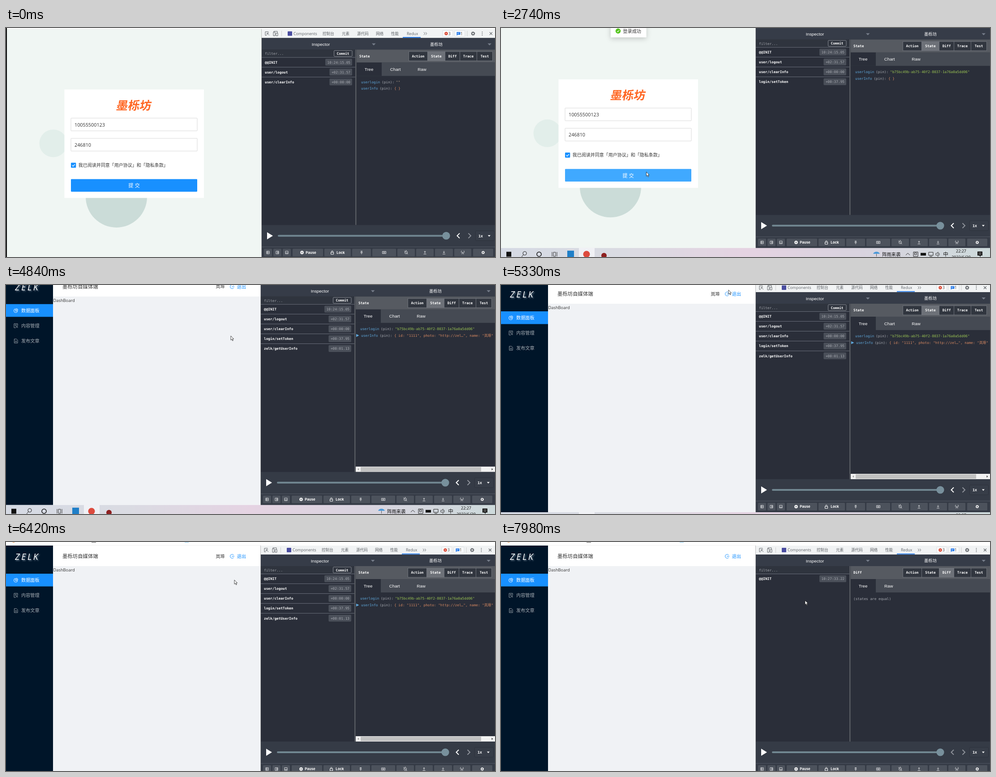
Animation, 1092 px wide and 513 px high, one loop 8000 ms. Source, as an HTML page:

```html
<!DOCTYPE html>
<html lang="zh">
<head>
<meta charset="utf-8">
<title>Login state demo</title>
<style>
html, body { margin: 0; width: 100%; height: 100%; overflow: hidden; background: #000; }
svg { display: block; width: 100vw; height: 100vh; }
text { white-space: pre; font-family: "Open Sans", "Noto Sans CJK SC", "Noto Sans CJK", sans-serif; }
.m { font-family: "DejaVu Sans Mono", "Noto Sans CJK SC", "Noto Sans CJK", monospace; }
.a { font-family: "Liberation Sans", "Noto Sans CJK SC", "Noto Sans CJK", sans-serif; }
</style>
</head>
<body>
<svg id="stage" viewBox="0 0 1092 513"></svg>
<script>
const LOGO = '墨栎坊', USER = '岚埠', DARK = '#2a2e39', BLUE = '#1890ff';

// Markup helpers; text is placed by its vertical centre
const rect = (x, y, w, h, fill, more = '') => `<rect x="${x}" y="${y}" width="${w}" height="${h}" fill="${fill}" ${more}/>`;
const circle = (x, y, r, fill, more = '') => `<circle cx="${x}" cy="${y}" r="${r}" fill="${fill}" ${more}/>`;
const fillPath = (d, fill, more = '') => `<path d="${d}" fill="${fill}" ${more}/>`;
const line = (d, color, w = 1, more = '') => `<path d="${d}" fill="none" stroke="${color}" stroke-width="${w}" ${more}/>`;
const text = (x, y, s, size, fill, more = '') =>
  `<text x="${x}" y="${y + size * .37}" font-size="${size}" fill="${fill}" ${more}>${s}</text>`;
const mono = (x, y, s, fill, more = '') => text(x, y, s, 7.77, fill, `class="m" ${more}`);
const bold = (x, y, s, more = '') => mono(x, y, s, '#fff', `font-weight="700" ${more}`);
const group = (id, ...parts) => `<g id="${id}">${parts.join('')}</g>`;
const at = (x, y, s) => `<g transform="translate(${x} ${y})">${s}</g>`;
const MID = 'text-anchor="middle"', END = 'text-anchor="end"';

const gear = c => circle(0, 0, 2.7, 'none', `stroke="${c}" stroke-width="1.8"`) +
  circle(0, 0, 3.9, 'none', `stroke="${c}" stroke-width="1.3" stroke-dasharray="1.5 1.56"`);

function loginPage() {
  const field = (y, s) => rect(143, y, 282, 28.5, '#fff', 'stroke="#d9d9d9" rx="1"') + text(151, y + 14.7, s, 10.8, '#333');
  return group('login',
    rect(0, 8, 569, 513, '#f0f6f3'),
    circle(103.5, 264, 31, '#e2eeea'), circle(244.5, 384, 68.5, '#cbdcd8'),
    rect(128.5, 143.3, 311.5, 243, '#fff'),
    `<g transform="translate(284 179) skewX(-10)">${text(0, 0, LOGO, 26, '#ff6622', `font-weight="900" ${MID}`)}</g>`,
    field(207.5, '10055500123'), field(252.8, '246810'),
    rect(143, 307.3, 11.3, 11.3, BLUE, 'rx="1.3"'), line('M145.6 313l2.2 2.3 4-4.4', '#fff', 1.3),
    text(159.7, 313, '我已阅读并同意「用户协议」和「隐私条款」', 10, '#333'),
    rect(143, 344, 282, 28.3, 'none', `id="wave" stroke="${BLUE}"`),
    rect(143, 344, 282, 28.3, BLUE, 'id="submit" rx="1.4"'),
    text(284, 358.5, '提 交', 11.4, '#fff', MID));
}

function dashboard() {
  const item = (y, s, icon, c) => at(22, y, line(icon, c, .9)) + text(34, y, s, 10.2, c);
  const doc = 'M-3.5 -4.5H1.5L4 -2V4.5H-3.5ZM-1.5 0H2M-1.5 2H2';
  const logo = (dx, c, more = '') => text(20 + dx, 33 + dx, 'ZELK', 20, c,
    `font-style="italic" letter-spacing="3.4" ${more}`);
  return group('board',
    rect(0, 8, 569, 513, '#f0f2f5'), rect(105, 8, 464, 46, '#fff'), rect(0, 8, 105, 513, '#001529'),
    logo(2, '#9ab', 'opacity=".7" filter="url(#soft)"'), logo(0, '#fff'),
    rect(0, 71, 105, 28.5, BLUE),
    item(85.5, '数据面板', 'M-1 -4A4.3 4.3 0 1 0 4 1H-1ZM1 -4.5V-1H4.5A3.6 3.6 0 0 0 1 -4.5', '#fff'),
    item(119.5, '内容管理', 'M0 4.5H-4V-4.5H4V0M-2 -2H2M-2 0H0M4.5 4.5L3 3M3.6 2A1.5 1.5 0 1 1 .6 2A1.5 1.5 0 1 1 3.6 2', '#a6adb4'),
    item(153.7, '发布文章', doc, '#a6adb4'),
    text(126, 32, LOGO + '自媒体端', 11.4, '#333'),
    group('user', text(468.5, 32, USER, 10, '#333')),
    at(505, 32, line('M3.6 -2.6A4.4 4.4 0 1 0 3.6 2.6M-1 0H5', BLUE, 1)),
    text(515.5, 32, '退出', 10.3, BLUE),
    text(105.5, 62.5, 'DashBoard', 9.3, '#333'));
}

function toolbar() {
  const tabs = [[640, 'Components'], [705, '控制台'], [748, '元素'], [782, '源代码'], [824, '网络'], [858, '性能'], [893, 'Redux']];
  const chip = (x, n, icon) => rect(x, 11, 23, 14, '#f8f9fa', 'stroke="#d0d3d7" stroke-width=".7" rx="1.5"') + icon +
    text(x + 13, 18.2, n, 8.4, '#444');
  return rect(569, 8, 523, 20, '#f1f3f4') +
    line('M584 15V14H577V22H580M581 17L586 22M581 21V17H585', '#5f6368') +
    line('M596 15V13H604V17M595 15H599V23H595ZM601 17H605V23H601Z', '#5f6368') +
    line('M613.5 12V24M1028 12V24', '#ccc') + rect(627, 13, 10, 10, '#4a4da0', 'rx="1"') +
    tabs.map(([x, s]) => text(x, 18, s, s === 'Components' ? 8.8 : 8.6, '#5f6368')).join('') +
    rect(884, 25.8, 40, 1.8, '#1a73e8') +
    line('M931 15l2.7 3-2.7 3M935 15l2.7 3-2.7 3', '#5f6368') +
    chip(973, 3, circle(981, 18, 3.7, '#d9432f') + line('M979.6 16.6l2.8 2.8M982.4 16.6l-2.8 2.8', '#fff', .8)) +
    chip(1000, 1, fillPath('M1004.5 14.5H1012.5V20.5H1007L1004.5 22.5Z', '#1a73e8') + line('M1006 16.7H1011M1006 18.5H1009', '#fff', .7)) +
    at(1041, 18, gear('#5f6368')) +
    [14.5, 18, 21.5].map(y => circle(1061.5, y, .9, '#5f6368')).join('') +
    line('M1078 15l6 6M1084 15l-6 6', '#5f6368', 1.2);
}

function row(i, name, time) {
  const y = 82.3 + 22.1 * i, w = time.length * 4.68 + 8.5;
  return (i ? rect(569, y - 11.5, 209, 1, '#6b707c') : '') + bold(576, y, name) +
    rect(771 - w, y - 7.7, w, 15.3, '#4a4f59', 'rx="2"') + mono(767, y, time, '#a9acb3', END);
}

function header(active, tabs) {
  const modes = [['Action', 898, 42], ['State', 940, 39], ['Diff', 979, 33], ['Trace', 1012, 38], ['Test', 1050, 35]];
  return rect(781, 54, 311, 29, '#565a61') + rect(781, 83, 311, 30, '#454a53') + rect(781, 83, 56, 30, DARK) +
    bold(787, 68.3, active) +
    modes.map(([s, x, w]) => rect(x - .5, 58.5, w, 20.5, s === active ? '#6d7178' : '#31363f', 'stroke="#777b83" stroke-width=".8"') +
      bold(x + w / 2 - .5, 68.5, s, MID)).join('') +
    tabs.map(([s, x]) => text(x, 98, s, 9.7, '#fff', `class="a" ${MID}`)).join('');
}

function tree() {
  const key = (x, y, s) => mono(x, y, s, '#5fa8dc') + mono(x + s.length * 4.68 + 4, y, '(pin):', '#a9acb3');
  return header('State', [['Tree', 808.5], ['Chart', 867.7], ['Raw', 927]]) +
    key(791, 126.5, 'userlogin') +
    group('noToken', mono(869, 126.5, '""', '#b5a08a')) +
    group('token', mono(869, 126.5, '"b75bc49b-ab75-40f2-8037-1a76a0a5dd06"', '#9cc653')) +
    group('noInfo', key(791, 141.2, 'userInfo'), mono(865, 141.2, '{ }', '#d98a62')) +
    group('info', fillPath('M782 138L788.5 141.3L782 144.6Z', '#5fa8dc'), key(793, 141.2, 'userInfo'),
      mono(867, 141.2, `{ id: "1111", photo: "http://zel…", name: "${USER}"`, '#d98a62'),
      rect(781, 435, 311, 12, '#f1f1f1'), rect(792, 436, 269, 10, '#c1c1c1'),
      fillPath('M785 441l3-2.4v4.8Z', '#999'), fillPath('M1087.5 441l-3-2.4v4.8Z', '#444'));
}

function footer() {
  const box = 'M-3 -3H3V3H-3Z';
  const icons = [
    [574, 18, box + 'M-1 -3V3M-3 0H3'], [595, 18, box + 'M1 -3V3M-1 0H3'], [616, 18, box + 'M-3 1H3'],
    [638, 68, '', 'Pause'], [709, 59, '', 'Lock'],
    [771, 42, 'M-2 -3H2M-1 -3V0M1 -3V0M-2.5 .6H2.5M0 0V4'], [816, 53, 'M-4 -2.5H4V2.5H-4ZM-2.5 -.7H2.5M-2 1H2'],
    [872, 39, 'M3 0A3 3 0 1 1 0 -3A3 3 0 0 1 3 0M-4 -4L4 4M-1 -4.5H1'], [914, 39, 'M0 2V-3M-2 -1L0 -3L2 -1M-3 3.5H3'],
    [956, 40, 'M0 -3.5V1M-2 -1L0 1L2 -1M-3 3.5H3'], [999, 38, 'M0 -1L-2 4M0 -1L2 4M-2.5 -4A4 4 0 0 0 -2.5 1M2.5 -4A4 4 0 0 1 2.5 1'], [1041, 45, 'gear']];
  return rect(569, 447, 523, 74, '#353b46') + rect(569, 495.5, 523, 1, '#555b66') +
    fillPath('M581 463L594 471L581 479Z', '#fff') + rect(605, 469, 376, 4, '#718791', 'rx="2"') + circle(981, 471, 8.6, '#78909c') +
    line('M1011 465.5L1005.5 471L1011 476.5', '#fff', 2, 'id="prev"') + line('M1030.5 465.5L1036 471L1030.5 476.5', '#8f939b', 2) +
    rect(1046.5, 460, 42, 22, '#373d48', 'stroke="#2d323c" rx="2"') + text(1053, 471, '1x', 8.8, '#fff', 'class="a" font-weight="700"') +
    fillPath('M1074 469.5H1080L1077 473Z', '#fff') +
    icons.map(([x, w, d, label]) => rect(x, 500, w, 17, '#4c525c', 'rx="1.5"') + at(x + w / 2, 508.5,
      d === 'gear' ? `<g transform="scale(.8)">${gear('#fff')}</g>` :
      label === 'Pause' ? circle(-13, 0, 3.8, '#fff') + line('M-14 -1.6V1.6M-12 -1.6V1.6', '#4c525c') :
      label === 'Lock' ? line('M-15 -.5H-9V4H-15ZM-13.7 -.5V-2A1.7 1.7 0 0 1 -10.3 -2V-.5', '#fff') : line(d, '#e8e9eb', .9)) +
      (label ? text(x + w / 2 + 7, 508.5, label, 7.8, '#fff', `font-weight="700" class="m" style="font-family:Inter,sans-serif" ${MID}`) : '')).join('');
}

const panel = () => toolbar() + rect(569, 28, 523, 493, DARK) + rect(569, 28, 523, 26, '#363c48') +
  text(701, 42, 'Inspector', 9.9, '#fff', `class="a" ${MID}`) + text(959, 42, LOGO, 9.4, '#fff', `class="a" ${MID}`) +
  fillPath('M815 40H823.5L819.2 44.5Z', '#777e8b') + fillPath('M1073.5 40H1082L1077.8 44.5Z', '#777e8b') +
  rect(569, 54, 209, 17, '#2f343e') + mono(576, 63, 'filter...', '#a5a8ae') + rect(569, 71, 209, 1, '#6b707c') +
  group('session', rect(730.5, 56, 40.5, 13.3, 'none', 'stroke="#8a8e96" rx="1.5"'), bold(750.5, 62.8, 'Commit', MID),
    row(0, '@@INIT', '10:24:15.05'), row(1, 'user/logout', '+02:31.57'), row(2, 'user/clearInfo', '+00:00:00'),
    group('row3', row(3, 'login/setToken', '+00:37.95')), group('row4', row(4, 'zelk/getUserInfo', '+00:01.13')), tree()) +
  group('fresh', row(0, '@@INIT', '10:27:33.22'), header('Diff', [['Tree', 808.5], ['Raw', 865.7]]),
    mono(787, 127, '(states are equal)', '#a9acb3')) +
  rect(778, 54, 2.5, 393, '#565a61') + footer();

const taskbar = () => rect(-4, 521, 1100, 40, 'url(#bar)') +
  rect(174, 521, 35, 40, '#f0f1f5', 'id="tabA"') + rect(209, 521, 35, 40, '#f0f1f5', 'id="tabB"') +
  rect(12, 529.5, 11, 11, '#111') + circle(53, 533, 4, 'none', 'stroke="#222" stroke-width="1.1"') + line('M50 536L46 541', '#222') +
  circle(85, 535, 5, 'none', 'stroke="#111" stroke-width="1.5"') +
  line('M114 530V540M117 530.5H122V539.5H117ZM125 530V540', '#333') +
  rect(148, 527, 15, 15, '#1f7fc8') + circle(191, 535, 7.5, '#dd4b3e') + circle(230, 538, 6, '#8e2020') +
  fillPath('M831 534A8 7 0 0 1 846 534Z', '#4798d8') + line('M838.5 534V540', '#555') +
  text(851, 535, '阵雨来袭', 10.3, '#111') + line('M904 537L908.5 532.5L913 537', '#222') +
  line('M921 530H931V540H921ZM923.5 532H928V536H923.5Z', '#222') + rect(937, 532, 12, 6, '#111') +
  line('M955 530.5H965V537.5H955ZM957 540H963', '#222') + line('M971 533H973L976 530V540L973 537H971ZM978 532Q980.5 535 978 538', '#222', .9) +
  group('en', text(993, 534.5, '英', 11.5, '#111', MID)) + group('cn', text(993, 534.5, '中', 11.5, '#111', MID)) +
  text(1027.5, 528, '22:27', 9, '#111', MID) + text(1027.5, 541.5, '2022/6/20', 9, '#111', MID) +
  fillPath('M1064 529H1075V538H1071V541L1068 538H1064Z', '#111') + line('M1066 532H1073M1066 535H1073', '#ddd', .8);

const stage = document.getElementById('stage');
stage.innerHTML = `<defs>
  <linearGradient id="bar"><stop offset="0" stop-color="#d5dae4"/><stop offset=".25" stop-color="#dadbe2"/>
  <stop offset=".5" stop-color="#e5d3e2"/><stop offset=".72" stop-color="#d9d3df"/><stop offset="1" stop-color="#cddadb"/></linearGradient>
  <filter id="soft"><feGaussianBlur stdDeviation="1.5"/></filter>
  <filter id="shadow" x="-40%" y="-60%" width="180%" height="260%"><feDropShadow dx="0" dy="3" stdDeviation="6" flood-opacity=".2"/></filter>
</defs>` +
  group('world', rect(0, -2, 1096, 560, '#fff'),
    circle(17, -3, 4, '#e8862e'), rect(191, -6, 10, 6.8, '#222'), rect(399, -6, 9, 6.6, '#35a5e5'),
    rect(0, 7.6, 569, .8, '#ddd'), loginPage(), dashboard(),
    group('toast', rect(245, 21, 79.5, 28.3, '#fff', 'filter="url(#shadow)" rx="1.4"'),
      circle(261.5, 35, 5.7, '#52c41a'), line('M258.9 35l2 2.1 3.4-4', '#fff', 1.2), text(272.3, 35, '登录成功', 10.2, '#333')),
    panel(), rect(568.2, 8, .8, 513, '#aaa'), taskbar()) +
  group('cursor',
    group('arrow', fillPath('M0 0V9.4L2.2 7.4L3.8 11L5.3 10.3L3.7 6.8H6.6Z', '#fff', 'stroke="#111" stroke-width=".75"')),
    group('hand', fillPath('M-1 1Q0 -.6 1 1V5L4.2 5.8Q5.4 6.2 5 8L4.2 12.5H-1L-3.6 8.5Q-3.6 6.6 -1 8Z', '#fff', 'stroke="#111" stroke-width=".75"')));

const el = Object.fromEntries([...stage.querySelectorAll('[id]')].map(e => [e.id, e]));
const show = (id, on) => el[id].style.display = on ? '' : 'none';
const move = (id, x, y) => el[id].setAttribute('transform', `translate(${x} ${y})`);
const span = (t, a, b) => Math.min(1, Math.max(0, (t - a) / (b - a)));
const ease = p => p * p * (3 - 2 * p);

// Keys are [time, ...values]
function track(keys, t, curve = p => p) {
  const i = Math.max(1, keys.findIndex(k => k[0] > t));
  const last = keys[keys.length - 1];
  if (t >= last[0]) return last.slice(1);
  const a = keys[i - 1], b = keys[i], p = curve(span(t, a[0], b[0]));
  return a.slice(1).map((v, j) => v + (b[j + 1] - v) * p);
}

const camera = [[70, 2, -5.6], [360, 0, -28.2], [5157, 0, -28.2], [5460, 0, 0]];
const pointer = [[330, 228, 516], [820, 318, 382], [1100, 325, 323], [2740, 324.5, 322.5], [3430, 398, 288],
  [3760, 398, 288], [4380, 502, 114], [4840, 502, 114], [5330, 508, 11], [5660, 507.5, 12],
  [5950, 510, 79], [6280, 510, 79], [6420, 510, 85], [7350, 510, 85], [7980, 679, 131]];

function draw(t) {
  move('world', ...track(camera, t));
  move('cursor', ...track(pointer, t, ease));
  const over = t >= 1030 && t < 2740, loggedIn = t >= 1860, board = t >= 2810, info = t >= 2950, fresh = t >= 7560;
  show('cursor', t >= 330); show('hand', over); show('arrow', !over);
  show('login', !board); show('board', board); show('user', info && !fresh);
  show('session', !fresh); show('fresh', fresh);
  show('token', loggedIn); show('noToken', !loggedIn); show('row3', loggedIn);
  show('info', info); show('noInfo', !info); show('row4', info);
  const active = t >= 1580;
  show('tabA', active); show('tabB', !active); show('cn', active); show('en', !active);
  el.prev.setAttribute('stroke', fresh ? '#8f939b' : '#fff');

  const h = span(t, 1060, 1300), pressed = t >= 1650 && t < 1720;
  el.submit.setAttribute('fill', pressed ? '#096dd9' : `rgb(${24 + 40 * h},${144 + 25 * h},255)`);
  const w = span(t, 1720, 2130), grow = 3 * w;
  el.wave.setAttribute('stroke-width', 2 * grow);
  el.wave.setAttribute('opacity', .25 * (1 - w));

  const enter = ease(span(t, 1860, 2100)), leave = ease(span(t, 2830, 3050));
  move('toast', 0, -22 * (1 - enter) - 22 * leave);
  el.toast.setAttribute('opacity', enter * (1 - leave));
}

const start = performance.now();
(function tick() {
  draw((performance.now() - start) % 8000);
  requestAnimationFrame(tick);
})();
</script>
</body>
</html>
```
